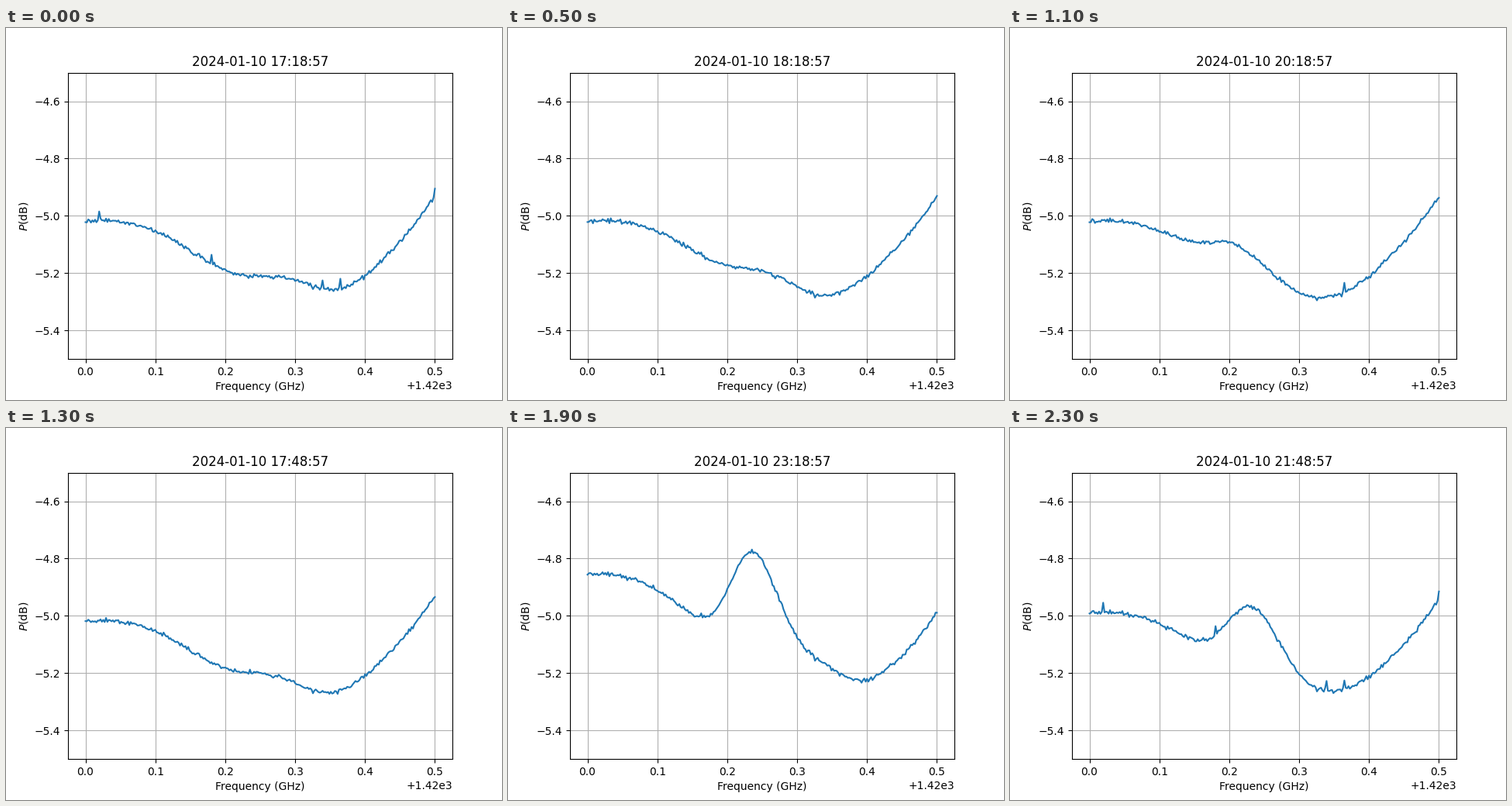
Recreate the animation shown at these times as a matplotlib script. Size 640 by 480 pixels, loop 2400 ms.

```python
import numpy as np
import matplotlib.pyplot as plt
from matplotlib.animation import FuncAnimation

START = 1420.0
SPAN = 0.5
N = 256
x = np.linspace(0, SPAN, N)

# Order in which the half-hourly spectra appear, 100 ms each
TIMES = ("17:18 17:18 22:48 13:18 16:18 18:18 12:48 15:18 "
         "14:18 19:18 16:48 20:18 23:48 17:48 20:48 13:48 "
         "14:48 18:48 15:48 23:18 19:48 21:18 22:18 21:48").split()

# Receiver band shape in mdB relative to -5 dB, smoothed by a polynomial
band_x = np.linspace(0, SPAN, 11)
band_y = [-20, -21, -55, -125, -205, -280, -310, -285, -212, -90, 65]
band = np.polynomial.Polynomial.fit(band_x, band_y, 7)(x)

# Times with narrow interference, and where it sits
COMB = [0.02, 0.18, 0.34, 0.364, 0.5]
BURSTS = {"17:18": COMB, "20:18": [0.364], "21:48": COMB}

ripple = np.random.default_rng(4).normal(0, 3, N)


def minutes(stamp):
    h, m = stamp.split(":")
    return int(h) * 60 + int(m)


def pulse(t, centre, width):
    return np.exp(-((t - centre) / width) ** 2)


def bell(centre, left, right):
    """Gaussian with its own sigma on each side."""
    sigma = np.where(x < centre, left, right)
    return np.exp(-((x - centre) / sigma) ** 2 / 2)


def spectrum(stamp):
    # Hours since 13:18
    t = np.clip((minutes(stamp) - minutes("13:18")) / 60, 0, 10)

    # The line drifts down the band, then settles and grows
    centre = np.interp(t, [0, 2, 4, 7, 8.5, 10],
                       [0.413, 0.345, 0.288, 0.215, 0.235, 0.239])
    height = 88 + 92 * pulse(t, 0, 1.4) + 330 * pulse(t, 10, 2)
    left = 0.058 - 0.0025 * t
    right = 0.041 + 0.017 * pulse(t, 6.8, 1.2)
    y = band + height * bell(centre, left, right)

    # Level drift: early offset, late tilt with a shoulder beside the line
    late = pulse(t, 10, 1.15)
    y += 16 * np.exp(-t / 1.5)
    y += late * 110 * (0.5 + np.cos(np.pi * x / SPAN))
    y += late * 112 * bell(0.333, 0.037, 0.037)

    for p in BURSTS.get(stamp, []):
        y[round(p / SPAN * (N - 1))] += 30

    rng = np.random.default_rng(minutes(stamp))
    return -5 + (y + ripple + rng.normal(0, 2.4, N)) / 1000


fig, ax = plt.subplots(figsize=(6.4, 4.8), dpi=100)
line, = ax.plot(START + x, spectrum(TIMES[0]))
ax.set_ylim(-5.5, -4.5)
ax.set_xlabel("Frequency (GHz)")
ax.set_ylabel("$P$(dB)")
ax.grid()
title = ax.set_title("")


def update(n):
    stamp = TIMES[n]
    line.set_ydata(spectrum(stamp))
    title.set_text(f"2024-01-10 {stamp}:57")
    return line, title


anim = FuncAnimation(fig, update, frames=len(TIMES), interval=100,
                     repeat=True, repeat_delay=0)
plt.show()
```
